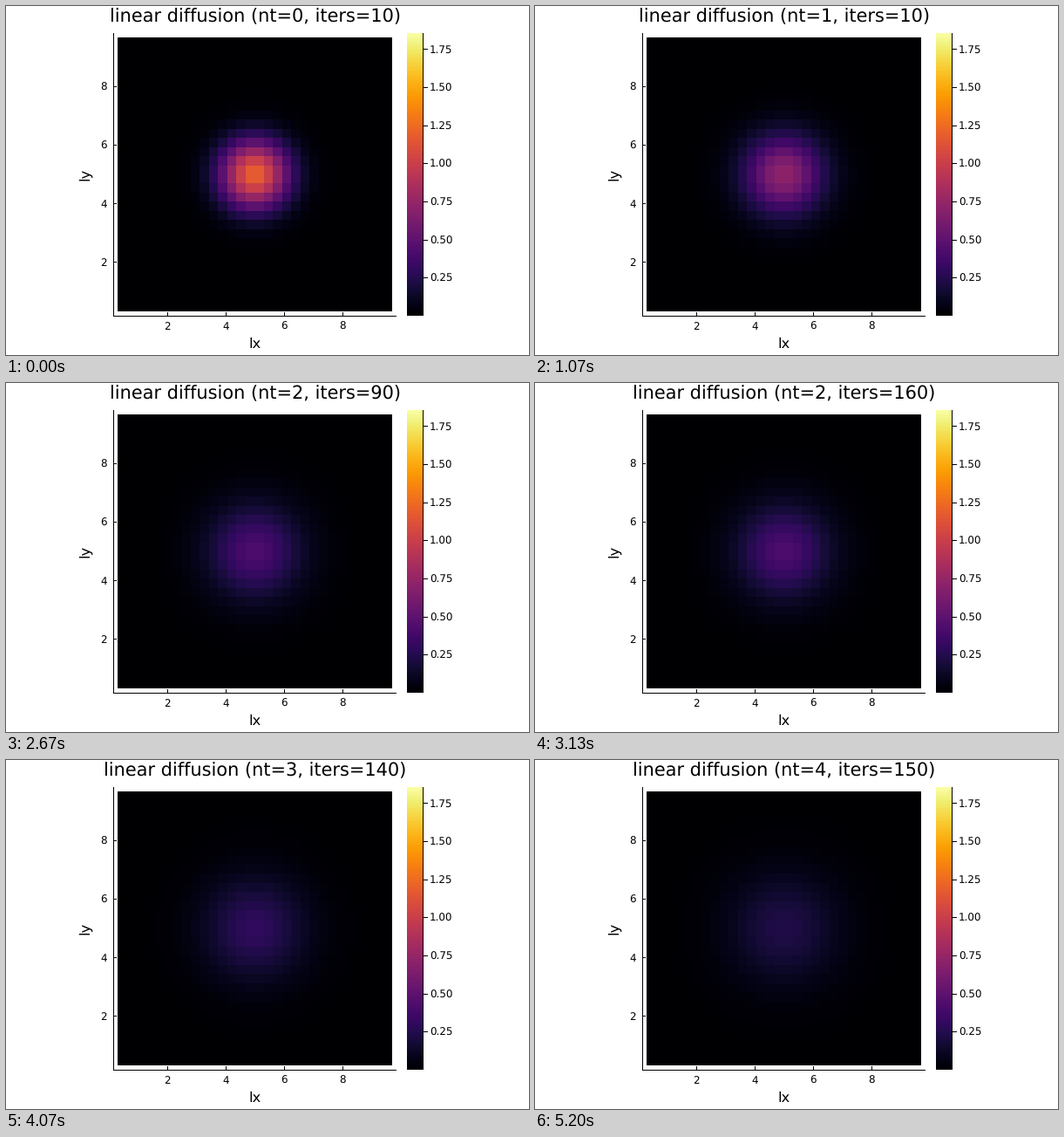
Recreate the animation shown at these times as a matplotlib script. Size 600 px wide and 400 px high, loop 5.27 s.

```python
import numpy as np
import matplotlib.pyplot as plt
from matplotlib.animation import FuncAnimation

plt.rcParams["font.family"] = "DejaVu Sans"
plt.rcParams["text.hinting"] = "none"

W, H, DPI = 600, 400, 100
N_TICKS, STEP_MS = 170, 31          # 5270 ms per loop
N_SHOTS, PER_STEP, N_OUT = 79, 16, 10

# Physics and grid
L, D, DT, NX = 10.0, 1.0, 0.2, 32
DX = L / NX
DTAU = 1 / (6.1 * D / DX**2 + 1 / DT)


def solve():
    """3D implicit diffusion by pseudo-time iteration; keeps the mid-plane every N_OUT."""
    g = np.exp(-(((np.arange(NX) + 0.5) * DX - L / 2) ** 2))
    h = 2 * g[:, None, None] * g[:, None] * g
    inner = slice(1, -1)
    mid = h[inner, inner, inner]
    vmax, shots = h.max(), []
    while len(shots) < N_SHOTS:
        old = mid.copy()
        for it in range(1, PER_STEP * N_OUT + 1):
            lap = (h[2:, inner, inner] + h[:-2, inner, inner]
                   + h[inner, 2:, inner] + h[inner, :-2, inner]
                   + h[inner, inner, 2:] + h[inner, inner, :-2] - 6 * mid)
            mid += DTAU * (D * lap / DX**2 - (mid - old) / DT)
            if it % N_OUT == 0:
                shots.append(mid[NX // 2 - 1].copy())
    return shots[:N_SHOTS], vmax


fig = plt.figure(figsize=(W / DPI, H / DPI), dpi=DPI, facecolor="white")
ax = fig.add_axes([0, 0, 1, 1])
ax.axis("off")


def line(x0, y0, x1, y1):
    ax.plot([x0, x1], [y0, y1], color="black", lw=72 / DPI,
            solid_capstyle="butt", snap=False)


def text(x, y, s, px, ha="center", va="baseline", **kw):
    return ax.text(x, y, s, fontsize=px * 72 / DPI, ha=ha, va=va, **kw)


def crisp(v):
    return np.floor(v) + 0.5


shots, vmax = solve()
heat = ax.imshow(shots[0], cmap="inferno", vmin=0, vmax=vmax, aspect="auto",
                 interpolation="nearest", extent=(128, 443, 350, 36))
ax.imshow(np.linspace(1, 0, 256)[:, None], cmap="inferno", aspect="auto",
          interpolation="nearest", extent=(460, 478, 355, 31))

# Axes
line(123.5, 31, 123.5, 356)
line(123, 355.5, 448, 355.5)
for v in (2, 4, 6, 8):
    x, y = 285.6 + 33.5 * (v - 5), 193.4 - 33.5 * (v - 5)
    line(crisp(x), 355, crisp(x), 351)
    line(124, crisp(y), 127, crisp(y))
    text(x, 371.3, str(v), 11.9)
    text(115.5, y + 4.3, str(v), 11.9, ha="right")
text(285.6, 392, "lx", 16.4)
text(98, 192.6, "ly", 16.4, ha="right", va="center", rotation=90)

# Colour bar
line(478.5, 31, 478.5, 355)
for v in np.arange(0.25, 1.8, 0.25):
    y = 355.5 - 324.5 * v / vmax
    line(479, crisp(y), 484, crisp(y))
    text(486, y + 4.3, f"{v:.2f}", 11.9, ha="left")

title = text(285.8, 18, "", 20.83)
ax.set_xlim(0, W)
ax.set_ylim(H, 0)


def update(i):
    # 15 pictures per second
    k = min(int((i * STEP_MS + 33) * 0.015), N_SHOTS - 1)
    nt, j = divmod(k, PER_STEP)
    heat.set_data(shots[k])
    title.set_text(f"linear diffusion (nt={nt}, iters={(j + 1) * N_OUT})")
    return heat, title


anim = FuncAnimation(fig, update, frames=N_TICKS, interval=STEP_MS,
                     repeat=True, repeat_delay=0, blit=False)
plt.show()
```
